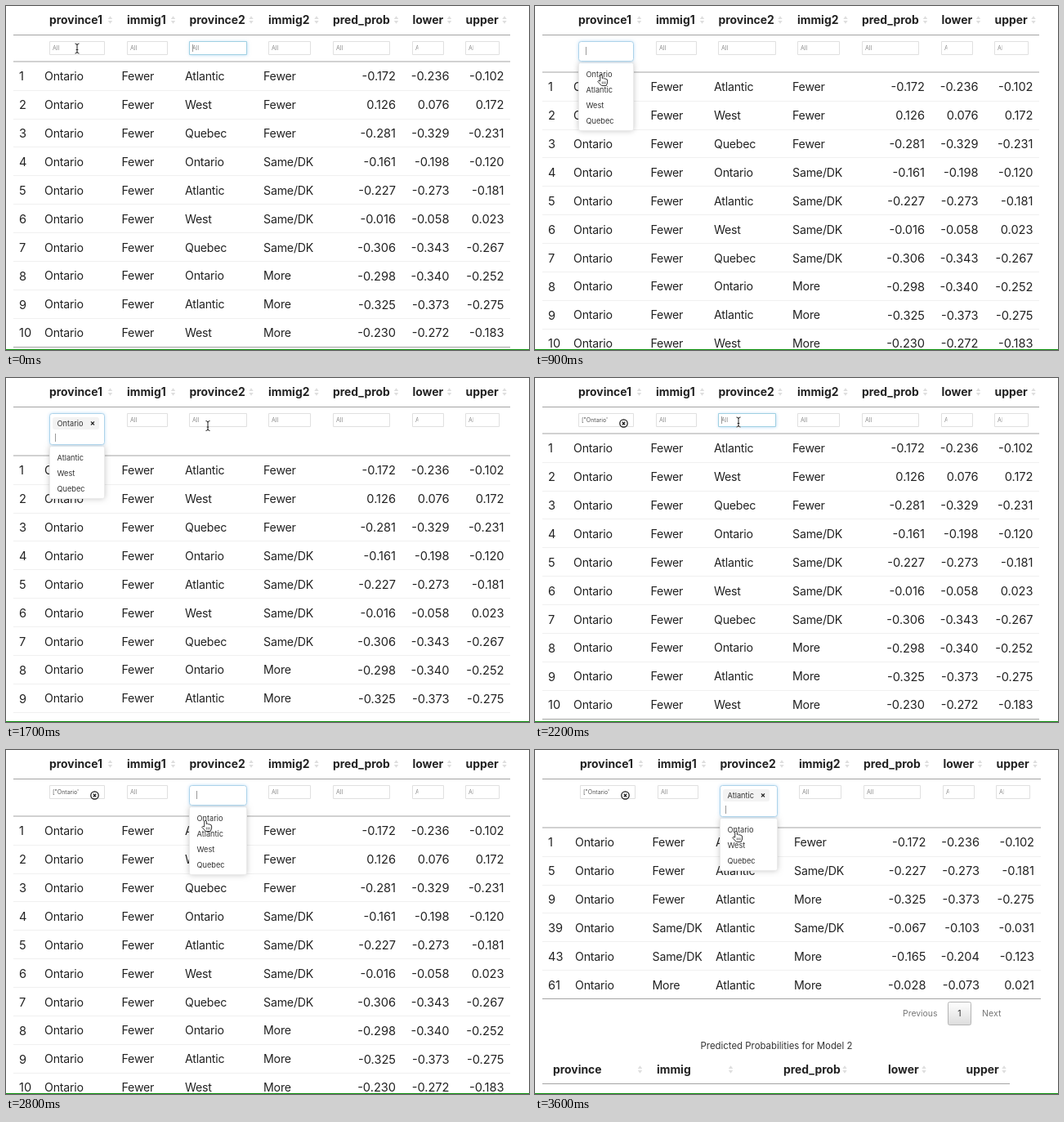
These frames come from a looping animation (640 px wide and 421 px high, 3.7 s). An HTML page with a canvas:

```html
<!DOCTYPE html>
<html lang="en">
<head>
<meta charset="utf-8">
<title>Filtering a table</title>
<style>
html, body { margin: 0; width: 100%; height: 100%; overflow: hidden; background: #fff; }
canvas { display: block; width: 640px; height: 421px; }
</style>
</head>
<body>
<canvas id="stage" width="640" height="421"></canvas>
<script>
const ctx = document.getElementById('stage').getContext('2d');
const LOOP = 3700, STEP = 100, PITCH = 34.9;
const WORD_SIZE = 14.2, WORD_TRACKING = -0.22, NUMBER_SIZE = 14.6;
const INK = '#222', FOCUS = '#add3ea', GLOW = 'rgba(102,175,233,.5)', LINE = '#a4a4a4';

// Moments of the story, in ms
const OPEN_1 = 200, PICK_1 = 1100, CLOSE_1 = 2100;
const OPEN_2 = 2400, PICK_2 = 3200, FILTERED = 3400;
const CLICKS = [100, PICK_1, 2000, PICK_2];
const BUSY = 200;

const PROVINCES = ['Ontario', 'Atlantic', 'West', 'Quebec'];
// title, title x, sort arrows x, input left, input right
const COLUMNS = [
  ['province1', 53, 127.5, 53, 121],
  ['immig1', 148, 204.5, 148, 198],
  ['province2', 224.5, 300, 224, 295],
  ['immig2', 321, 380, 321, 373],
  ['pred_prob', 400, 477.5, 400, 470],
  ['lower', 497.5, 542.5, 497, 536],
  ['upper', 562.5, 610, 562, 604]
];
const TEXT_X = [47, 141.5, 219, 315], NUMBER_X = [477, 542.5, 609.5];

const parse = text => text.trim().split('\n').map(line => line.trim().split(' '));
const ALL_ROWS = parse(`
  1 Ontario Fewer Atlantic Fewer -0.172 -0.236 -0.102
  2 Ontario Fewer West Fewer 0.126 0.076 0.172
  3 Ontario Fewer Quebec Fewer -0.281 -0.329 -0.231
  4 Ontario Fewer Ontario Same/DK -0.161 -0.198 -0.120
  5 Ontario Fewer Atlantic Same/DK -0.227 -0.273 -0.181
  6 Ontario Fewer West Same/DK -0.016 -0.058 0.023
  7 Ontario Fewer Quebec Same/DK -0.306 -0.343 -0.267
  8 Ontario Fewer Ontario More -0.298 -0.340 -0.252
  9 Ontario Fewer Atlantic More -0.325 -0.373 -0.275
  10 Ontario Fewer West More -0.230 -0.272 -0.183`);
const FILTERED_ROWS = [ALL_ROWS[0], ALL_ROWS[4], ALL_ROWS[8], ...parse(`
  39 Ontario Same/DK Atlantic Same/DK -0.067 -0.103 -0.031
  43 Ontario Same/DK Atlantic More -0.165 -0.204 -0.123
  61 Ontario More Atlantic More -0.028 -0.073 0.021`)];

// time, x, y, pointer shape from then on
const POINTER = [
  [0, 87, 52, 'beam'], [200, 87, 53, 'beam'], [600, 87, 53, 'beam'],
  [800, 83, 78, 'hand'], [900, 81, 84, 'hand'], [1100, 81, 84, 'arrow'],
  [1200, 81, 84, 'arrow'], [1400, 165, 72, 'arrow'], [1600, 242, 61, 'beam'],
  [1700, 247, 58.5, 'beam'], [2000, 247, 58.5, 'beam'], [2100, 249, 54, 'beam'],
  [2500, 249, 54, 'beam'], [2800, 244, 86, 'hand'], [3100, 246, 99, 'hand'],
  [LOOP, 246, 99, 'hand']
];
const SHAPES = {
  beam: new Path2D('M-2.5-6Q0-6 0-4Q0-6 2.5-6M0-4V4M-2.5 6Q0 6 0 4Q0 6 2.5 6M-1.3 1.5H1.3'),
  arrow: new Path2D('M0 0V10L2.4 7.9L4 11.6L5.7 10.9L4.1 7.3H7.2Z'),
  hand: new Path2D('M-1.3 8V1Q0-.8 1.3 1V4.5Q2.6 3.4 3.7 5Q5 4.2 6 5.6Q7.4 5.2 7.6 7V10L6.2 13.5H.5L-4.2 8.4Q-3.6 6.4-1.3 8Z')
};

// y is the middle of the capitals
function text(str, x, y, size, color = INK, align = 'left', weight = 400, tracking = 0) {
  ctx.font = `${weight} ${size}px Inter, "Liberation Sans", sans-serif`;
  ctx.letterSpacing = `${tracking}px`;
  ctx.fillStyle = color;
  ctx.textAlign = align;
  ctx.fillText(str, x, y + size * 0.364);
}

function rect(x, y, w, h, color) {
  ctx.fillStyle = color;
  ctx.fillRect(x, y, w, h);
}

function box(x, y, w, h, radius, fill, border, glow, blur = 4) {
  ctx.save();
  ctx.beginPath();
  ctx.roundRect(x + 0.5, y + 0.5, w - 1, h - 1, radius);
  if (glow) { ctx.shadowColor = glow; ctx.shadowBlur = blur; }
  ctx.fillStyle = fill;
  ctx.fill();
  ctx.shadowColor = 'transparent';
  ctx.strokeStyle = border;
  ctx.stroke();
  ctx.restore();
}

function sortArrows(x, y) {
  ctx.fillStyle = '#dedede';
  for (const dir of [-1, 1]) {
    ctx.beginPath();
    ctx.moveTo(x - 2.7, y + dir);
    ctx.lineTo(x + 2.7, y + dir);
    ctx.lineTo(x, y + dir * 4.8);
    ctx.fill();
  }
}

function heading(title, x, arrowX, y) {
  text(title, x, y, 13.9, INK, 'left', 700);
  sortArrows(arrowX, y);
}

function drawRows(rows, top, shift) {
  rows.forEach(([index, ...cells], i) => {
    const y = top + 18 + i * PITCH;
    text(index, 16, y, NUMBER_SIZE);
    cells.forEach((cell, c) => c < 4
      ? text(cell, TEXT_X[c] + shift, y, WORD_SIZE, INK, 'left', 400, WORD_TRACKING)
      : text(cell, NUMBER_X[c - 4] + shift * 0.75, y, NUMBER_SIZE, INK, 'right'));
    const last = i === rows.length - 1;
    rect(9, Math.round(y + 16.6), 608 + shift, 1, last ? LINE : '#f0f0f0');
  });
}

function drawProcessing() {
  const fade = ctx.createLinearGradient(-18, 0, 608, 0);
  [0, 0.9, 0.9, 0].forEach((a, i) => fade.addColorStop([0, 0.25, 0.75, 1][i], `rgba(255,255,255,${a})`));
  rect(0, 205, 608, 39, fade);
  text('Processing...', 295.5, 231.5, 12.7, '#333', 'center');
}

function drawInput(left, right, column, focused, value) {
  const w = right - left;
  box(left, 43, w, 17, 0, '#fff', focused ? '#9fd0e2' : '#e0e0e0', focused && GLOW);
  if (value) {
    text(`["${value}'`, left + 4, 51.5, 7, '#555');
    ctx.strokeStyle = '#111';
    ctx.lineWidth = 1.2;
    ctx.beginPath();
    ctx.arc(left + 55.5, 55.5, 4.7, 0, 7);
    for (const d of [-1.8, 1.8]) {
      ctx.moveTo(left + 55.5 - 1.8, 55.5 - d);
      ctx.lineTo(left + 55.5 + 1.8, 55.5 + d);
    }
    ctx.stroke();
    ctx.lineWidth = 1;
    return;
  }
  ctx.save();
  ctx.beginPath();
  ctx.rect(left, 43, { lower: 7.5, upper: 9.5 }[column] || w, 17);
  ctx.clip();
  text('All', left + 4, 51.5, 7, '#888');
  ctx.restore();
  if (focused) rect(left + 4, 47, 1, 9, '#999');
}

function drawPicker(left, right, picked, caret, marked) {
  const w = right - left, height = picked ? 39 : 25, top = 43 + height + 1;
  const options = PROVINCES.filter(name => name !== picked);
  box(left, top, w, options.length * 19 + 8, 2, '#fff', '#eaeaea', 'rgba(0,0,0,.25)', 7);
  if (marked) rect(left + 8, top + 8, 35, 13, '#f6efa6');
  options.forEach((name, i) => text(name, left + 9.5, top + 14.6 + i * 19, 9.2, '#333'));
  box(left, 43, w, height, 3, '#fff', FOCUS, GLOW);
  if (picked) {
    box(left + 4, 48, 57, 15, 2, '#f3f3f3', '#f3f3f3');
    text(picked, left + 9.5, 55.5, 9.2, '#333');
    text('×', left + 53, 55.5, 9.5, INK, 'center', 700);
  }
  if (caret) rect(left + (picked ? 7 : 9), picked ? 68 : 50, 1, 10, '#999');
}

function drawFooter() {
  text('Previous', 450, 322.5, 10.4, '#777');
  const shade = ctx.createLinearGradient(0, 308, 0, 337);
  shade.addColorStop(0, '#fff');
  shade.addColorStop(1, '#dcdcdc');
  box(505, 308, 29, 29, 2, shade, '#b4b4b4');
  text('1', 519.5, 322.5, 10.6, '#333', 'center');
  text('Next', 547, 322.5, 10.6, '#777');
  text('Predicted Probabilities for Model 2', 295.5, 361.5, 11.4, '#333', 'center');
  heading('province', 22, 128.5, 391);
  heading('immig', 149, 239.5, 391);
  heading('pred_prob', 304, 379, 391);
  heading('lower', 432, 476, 391);
  heading('upper', 527.5, 574, 391);
  rect(9, 408, 572, 1, LINE);
}

function drawPointer(t) {
  const next = POINTER.findIndex(key => key[0] > t);
  const [t0, x0, y0, shape] = POINTER[next - 1], [t1, x1, y1] = POINTER[next];
  const k = (t - t0) / (t1 - t0);
  const x = x0 + (x1 - x0) * k, y = y0 + (y1 - y0) * k;
  ctx.save();
  ctx.translate(x, y);
  ctx.lineJoin = 'round';
  if (CLICKS.some(click => t >= click && t < click + STEP)) {
    ctx.strokeStyle = '#222';
    ctx.lineWidth = 1.4;
    ctx.beginPath();
    ctx.arc(-1, 0, 17.5, 0, 7);
    ctx.stroke();
  }
  const hand = shape === 'hand';
  ctx.strokeStyle = hand ? '#333' : '#fff';
  ctx.lineWidth = hand ? 1 : 2.4;
  ctx.fillStyle = hand ? '#fff' : '#111';
  if (hand) ctx.fill(SHAPES.hand);
  ctx.stroke(SHAPES[shape]);
  if (shape === 'arrow') ctx.fill(SHAPES.arrow);
  if (shape === 'beam') {
    ctx.strokeStyle = '#222';
    ctx.lineWidth = 1;
    ctx.stroke(SHAPES.beam);
  }
  if (hand) {
    ctx.lineWidth = 0.7;
    ctx.stroke(new Path2D('M1.3 8.5V11.5M3.2 8.5V11.5M5.1 8.5V11.5'));
  }
  ctx.restore();
}

function draw(t) {
  const within = (from, to) => t >= from && t < to;
  const first = within(OPEN_1, CLOSE_1), second = t >= OPEN_2;
  const filtered = t >= FILTERED, shift = filtered ? 2 : 0;
  const picked = first ? t >= PICK_1 : t >= PICK_2;
  const top = first || second ? (picked ? 95 : 81) : 68;

  rect(0, 0, 640, 421, '#fff');
  drawRows(filtered ? FILTERED_ROWS : ALL_ROWS, top, shift);
  if (filtered) drawFooter();
  if (within(PICK_1, PICK_1 + BUSY) || within(PICK_2, FILTERED)) drawProcessing();

  rect(9, 35, 608 + shift, 1, LINE);
  rect(9, top - 0.5, 608 + shift, 1, LINE);
  ctx.save();
  ctx.translate(shift, 0);
  COLUMNS.forEach(([title, x, arrowX, left, right], i) => {
    heading(title, x, arrowX, 17);
    if (i === 0 && first) {
      drawPicker(left, right, picked && 'Ontario', !within(PICK_1, PICK_1 + BUSY), t < 700);
    } else if (i === 2 && second) {
      drawPicker(left, right, picked && 'Atlantic', true, false);
    } else {
      drawInput(left, right, title, i === 2 && !first, i === 0 && t >= CLOSE_1 && 'Ontario');
    }
  });
  ctx.restore();
  rect(0, 420, 640, 1, '#0a8f0a');
  drawPointer(t);
}

function frame() {
  const t = performance.now() % LOOP;
  draw(Math.floor(t / STEP) * STEP);
  requestAnimationFrame(frame);
}
frame();
</script>
</body>
</html>
```
